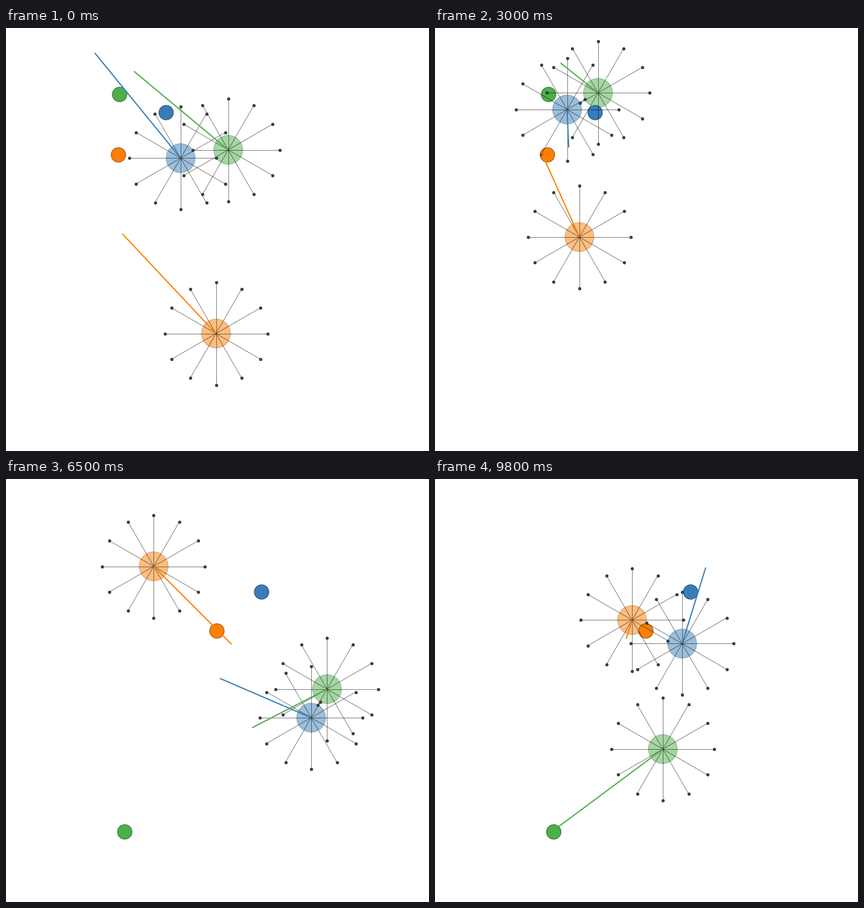
Animation of 700 by 700 pixels, one loop 9.9 s. Source, as a matplotlib script:

```python
import numpy as np
import matplotlib.pyplot as plt
from matplotlib.animation import FuncAnimation
from matplotlib.collections import LineCollection
from matplotlib.colors import to_rgb
from matplotlib.patches import Circle

SIZE, DPI = 700, 100
PX = 72 / DPI
DAMP, GAIN = 0.75, 0.01
BODY, GOAL, REACH = 24, 12, 85
RAYS = np.exp(1j * np.radians(np.arange(0, 360, 30)))
COLORS = ["#377eb8", "#4daf4a", "#ff7f00"]

# Points are complex numbers x + yj. Each agent has a goal and, for the
# scene's key steps, pairs of position and force.
MEET = dict(
    steps=55, keys=(0, 20, 40), from_rest=False, arrive=True,
    agents=[
        (265 + 140j, [(289 + 215.4j, -142 - 174j), (229 + 136.6j, -35 - 26j),
                      (224.5 + 166.5j, 56 + 79j)]),
        (188 + 110j, [(367.7 + 201.6j, -156 - 130j),
                      (295.4 + 133.6j, -67 - 77j),
                      (240.5 + 84.5j, -102 - 42j)]),
        (186 + 210j, [(347.5 + 505.6j, -155 - 165j), (271 + 406j, -87 - 155j),
                      (215 + 291.4j, -54 - 139j)]),
    ])
SPREAD = dict(
    steps=44, keys=(0, 10, 23, 43), from_rest=True, arrive=False,
    agents=[
        (423 + 187j, [(549.8 + 406.6j, 0), (505 + 395j, -151 - 65j),
                      (424.2 + 370.8j, -187 - 156j), (409 + 272.4j, 39 - 126j)]),
        (196.5 + 584j, [(573.5 + 334.3j, 0), (531.2 + 347.7j, -124 + 64j),
                        (483 + 358.2j, -33 + 34j), (377 + 447j, -172 + 128j)]),
        (349 + 251.5j, [(206 + 108.4j, 0), (244.4 + 144.6j, 129 + 129j),
                        (302 + 205.2j, 95 + 111j), (326.2 + 233.4j, -10 + 31j)]),
    ])


def solve_path(scene, goal, poses):
    """Smoothest force that carries a damped mass through its poses."""
    n, skip = scene["steps"], int(scene["from_rest"])
    steps = list(scene["keys"])
    if scene["arrive"]:
        steps.append(n - 1)
        poses = poses + [(goal, 0)]
    where, pull = np.array(poses, dtype=complex).T

    lag = np.subtract.outer(np.arange(n), np.arange(n))
    push = GAIN / (1 - DAMP) * (1 - DAMP ** np.maximum(lag + 1, 0))
    push = push - push[0]
    eye = np.eye(n)
    bend = 0.5 * np.diff(eye, 2, axis=0)[skip:]
    slope = 0.1 * np.diff(eye, axis=0)[skip:]

    rows = np.vstack([bend, slope, 200 * push[steps], 20 * eye[steps]])
    rhs = np.concatenate([np.zeros(len(bend) + len(slope)),
                          200 * (where - where[0]), 20 * pull])
    force = np.linalg.lstsq(rows.astype(complex), rhs, rcond=None)[0]
    if scene["from_rest"]:
        force[0] = 0
    return where[0] + push @ force, force


def ray_lengths(center, others):
    """Sensor rays stop at the first body they meet."""
    reach = np.full(len(RAYS), float(REACH))
    for other in others:
        local = (other - center) / RAYS
        half = BODY ** 2 - local.imag ** 2
        hit = local.real - np.sqrt(np.maximum(half, 0))
        reach = np.where((half > 0) & (hit > 0), np.minimum(reach, hit), reach)
    return reach


def xy(points):
    return np.column_stack([np.real(points), np.imag(points)])


fig = plt.figure(figsize=(SIZE / DPI, SIZE / DPI), dpi=DPI, facecolor="white")
ax = fig.add_axes([0, 0, 1, 1])
ax.set_xlim(0, SIZE)
ax.set_ylim(SIZE, 0)
ax.axis("off")


def add_disc(color, radius, alpha, edge_alpha, z):
    rgb = np.array(to_rgb(color))
    return ax.add_patch(Circle((0, 0), radius, fc=(*rgb, alpha),
                               ec=(*(rgb * 0.5), edge_alpha),
                               lw=1.2 * PX, zorder=z))


class Agent:
    def __init__(self, color):
        self.body = add_disc(color, BODY, 0.5, 0.3, 1)
        self.goal = add_disc(color, GOAL, 1, 0.75, 2)
        self.rays = LineCollection([], colors=[(0, 0, 0, 0.5)],
                                   linewidths=PX, zorder=3)
        ax.add_collection(self.rays, autolim=False)
        self.dots, = ax.plot([], [], "o", ms=4.6 * PX, mfc="#404040",
                             mec="#202020", mew=0.6 * PX, zorder=3.5)
        self.arrow, = ax.plot([], [], color=color, lw=2 * PX, zorder=4,
                              solid_capstyle="butt")

    def place(self, center, force, goal, others):
        ends = center + RAYS * ray_lengths(center, others)
        self.body.center = center.real, center.imag
        self.goal.center = goal.real, goal.imag
        self.rays.set_segments([xy([center, end]) for end in ends])
        self.dots.set_data(ends.real, ends.imag)
        self.arrow.set_data(*xy([center, center + force]).T)


scenes = [MEET, SPREAD]
paths = [[solve_path(s, *a) for a in s["agents"]] for s in scenes]
timeline = [(k, step) for k, s in enumerate(scenes) for step in range(s["steps"])]
agents = [Agent(color) for color in COLORS]


def draw(i):
    k, step = timeline[i]
    centers = [where[step] for where, _ in paths[k]]
    for j, agent in enumerate(agents):
        others = centers[:j] + centers[j + 1:]
        goal = scenes[k]["agents"][j][0]
        agent.place(centers[j], paths[k][j][1][step], goal, others)
    return []


anim = FuncAnimation(fig, draw, frames=len(timeline), interval=100,
                     repeat=True, repeat_delay=0, blit=False)
plt.show()
```
